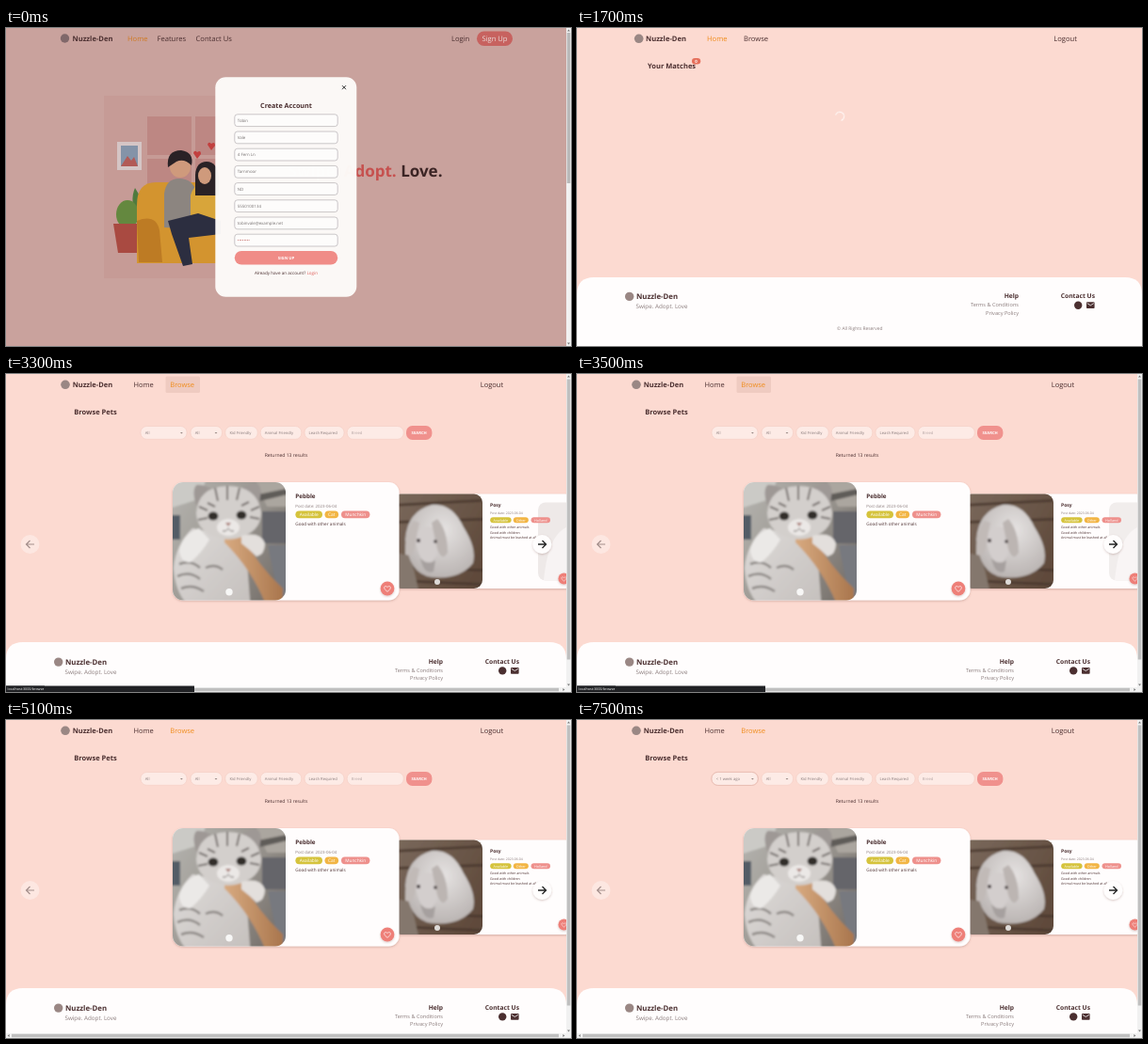
An HTML page for the animation above (8 s loop, 600 by 338 pixels).

```html
<!DOCTYPE html>
<html lang="en">
<head>
<meta charset="utf-8">
<title>Pet adoption site</title>
<style>
html, body { margin: 0; width: 100%; height: 100%; overflow: hidden; background: #fcdad1; }
svg { display: block; width: 600px; height: 338px; }
text { font-family: "Open Sans", sans-serif; fill: #4b2f30; white-space: pre; text-rendering: geometricPrecision; }
.b { font-weight: 700; }
.nav { font-size: 7.6px; }
.nav.slim { font-size: 7.5px; }
.head { font-size: 7.5px; font-weight: 700; }
.end { text-anchor: end; }
.mid { text-anchor: middle; }
.soft { fill: #8a7c7c; }
.white { fill: #fff; }
.hot { fill: #f08d1c; }
.logo { fill: #9a8784; }

/* One 8 s timeline drives every scene. */
.signup, .home, .browse, .bar, .wide, .menu, .pick-all, .pick-week, .old, .new, .focus, .tint {
  animation: 8s step-end infinite;
}
.signup { animation-name: signup; }
.home { animation-name: home; }
.browse, .wide { animation-name: browse; }
.bar { animation-name: bar; }
.menu { animation-name: menu; }
.pick-all { animation-name: pickAll; }
.pick-week { animation-name: pickWeek; }
.old { animation-name: old; }
.new { animation-name: new; }
.focus { animation-name: focus; }
.tint { animation-name: tint; }
.hover { animation: hover 8s linear infinite; }
.ghost { animation: ghost 8s linear infinite; }
.spin { animation: spin .8s linear infinite; transform-origin: 279px 94px; }
@keyframes signup { 0% { opacity: 1 } 1.25%, 100% { opacity: 0 } }
@keyframes home { 0% { opacity: 0 } 1.25% { opacity: 1 } 40%, 100% { opacity: 0 } }
@keyframes browse { 0% { opacity: 0 } 40%, 100% { opacity: 1 } }
@keyframes bar { 0% { opacity: 0 } 28.75% { opacity: 1 } 48.75%, 100% { opacity: 0 } }
@keyframes menu { 0% { opacity: 0 } 78.75% { opacity: 1 } 92.5%, 100% { opacity: 0 } }
@keyframes pickAll { 0% { opacity: 1 } 86.25%, 100% { opacity: 0 } }
@keyframes pickWeek { 0% { opacity: 0 } 86.25%, 100% { opacity: 1 } }
@keyframes old { 0% { opacity: 1 } 92.5%, 100% { opacity: 0 } }
@keyframes new { 0% { opacity: 0 } 92.5%, 100% { opacity: 1 } }
@keyframes focus { 0% { opacity: 0 } 78.75%, 100% { opacity: 1 } }
@keyframes tint { 0% { fill: #4b2f30 } 28.75%, 100% { fill: #f08d1c } }
@keyframes hover { 0%, 28.75% { opacity: 0 } 31.25%, 46.25% { opacity: 1 } 48.75%, 100% { opacity: 0 } }
@keyframes ghost { 0%, 42.5% { opacity: 1 } 50%, 100% { opacity: 0 } }
@keyframes spin { from { transform: rotate(-207deg) } to { transform: rotate(153deg) } }
</style>
</head>
<body>
<svg viewBox="0 0 600 338">
  <defs>
    <filter id="haze"><feGaussianBlur stdDeviation=".6"/></filter>
    <filter id="photo"><feGaussianBlur stdDeviation=".8"/></filter>
    <filter id="shade" x="-20%" y="-20%" width="140%" height="140%">
      <feDropShadow dx="0" dy="1" stdDeviation="1" flood-color="#7a4a40" flood-opacity=".3"/>
    </filter>
    <linearGradient id="kitchen" x2="1" y2=".6">
      <stop offset="0" stop-color="#b9b8b4"/><stop offset=".6" stop-color="#9a9690"/><stop offset="1" stop-color="#77716c"/>
    </linearGradient>
    <linearGradient id="fur" x2="1" y2="1">
      <stop offset="0" stop-color="#dddad8"/><stop offset="1" stop-color="#c4bfbc"/>
    </linearGradient>
    <linearGradient id="arm" x2="1"><stop offset="0" stop-color="#d8aa80"/><stop offset="1" stop-color="#a9764d"/></linearGradient>
    <linearGradient id="floor" y2=".6"><stop offset="0" stop-color="#7d6d60"/><stop offset="1" stop-color="#5f493a"/></linearGradient>
    <radialGradient id="bunny" cx=".55" cy=".35" r=".7">
      <stop offset="0" stop-color="#e6e3e2"/><stop offset="1" stop-color="#b7b1af"/>
    </radialGradient>
    <clipPath id="catClip"><rect x="177" y="115" width="120" height="125.5" rx="11"/></clipPath>
    <clipPath id="bunClip"><rect x="410" y="127.5" width="96" height="100.5" rx="9"/></clipPath>
    <clipPath id="pageClip"><rect width="595" height="333"/></clipPath>
    <path id="heart" d="M0 3C-6-1-2.5-4.5 0-1.7 2.5-4.5 6-1 0 3Z" fill="none" stroke="#fff" stroke-width=".7"/>
    <g id="footLeft">
      <circle class="logo" cx="55.7" cy="285.4" r="4.7"/>
      <text class="b" x="63" y="288.4" font-size="7.8">Nuzzle-Den</text>
      <text class="soft" x="62.5" y="298.3" font-size="6.25">Swipe. Adopt. Love</text>
    </g>
    <g id="footRight">
      <g class="b end" font-size="6.7">
        <text x="469" y="287.4">Help</text>
        <text x="550" y="287.4">Contact Us</text>
      </g>
      <g class="end" font-size="5.6">
        <text class="soft" x="469" y="296.3">Terms &amp; Conditions</text>
        <text class="soft" x="469" y="304.8">Privacy Policy</text>
      </g>
      <circle cx="532.2" cy="294.7" r="4.2" fill="#4b2f30"/>
      <rect x="541" y="291.3" width="8.6" height="6.8" rx=".8" fill="#4b2f30"/>
      <path d="M541.8 292.6l3.5 2.2 3.5-2.2" fill="none" stroke="#fff" stroke-width=".8"/>
    </g>
  </defs>

  <rect width="600" height="338" fill="#fcdad1"/>

  <g class="signup">
    <rect width="600" height="338" fill="#c9a29d"/>
    <g class="nav" filter="url(#haze)">
      <circle cx="62.5" cy="11" r="4.7" fill="#80686a"/>
      <text class="b" x="70.5" y="14">Nuzzle-Den</text>
      <text x="129" y="14" style="fill:#cf7a22">Home</text>
      <text x="160.5" y="14">Features</text>
      <text x="201.5" y="14">Contact Us</text>
      <text x="473" y="14">Login</text>
      <rect x="500" y="3.5" width="38" height="15.5" rx="7.7" fill="#c7625f"/>
      <text class="mid" x="519" y="14" style="fill:#eadcda">Sign Up</text>
    </g>
    <g filter="url(#haze)">
      <rect x="104" y="72" width="196" height="194" fill="#c69b96"/>
      <path d="M150 94h47v41h-47zM201 94h26v41h-26zM150 139h47v30h-47zM201 139h26v30h-26z" fill="#bd8783"/>
      <rect x="118" y="121" width="26" height="30" fill="#d5c5c5"/>
      <rect x="122" y="125" width="18" height="22" fill="#8493a8"/>
      <path d="M122 147l7-11 4 5 3-4 4 10z" fill="#b25a56"/>
      <path d="M139 203q-8-20-2-33 8 10 6 30 2-18 12-22 0 16-11 26z" fill="#4f7a3f"/>
      <ellipse cx="129" cy="198" rx="12" ry="15" fill="#64883f"/>
      <path d="M114 208h32l-5 31h-22z" fill="#a94a41"/>
      <path d="M139 250v-62q0-24 20-24h66v86z" fill="#d3942f"/>
      <path d="M139 205q20-8 24 10l3 34h-25z" fill="#bd7b24"/>
      <path d="M168 212v-36q2-16 16-16t18 14l2 40z" fill="#8c8580"/>
      <path d="M196 208v-30q4-14 16-14t14 14v36z" fill="#d8a53a"/>
      <path d="M172 205l32-8 24 8v14l-34 4 4 28-10 2-12-34z" fill="#2c2e40"/>
      <circle cx="185" cy="148" r="11" fill="#cf9a7c"/>
      <path d="M172 148q-2-18 14-18 14 2 11 16-8-8-16-4z" fill="#2a2226"/>
      <path d="M201 178v-22q1-14 12-14t13 16v20z" fill="#2a2226"/>
      <ellipse cx="211" cy="157" rx="7" ry="9" fill="#cf9a7c"/>
      <path d="M203 139l-4-6q1-4 4-1 4-3 4 2zM218 130l-4-6q1-4 4-1 4-3 4 2z" fill="#c2403f"/>
    </g>
    <text class="b end" x="463.5" y="158" font-size="17"><tspan fill="#eed9d5">Swipe.</tspan> <tspan fill="#c6504e">Adopt.</tspan> <tspan fill="#3c2525">Love.</tspan></text>
    <rect x="222.3" y="52.3" width="150" height="233.5" rx="11" fill="#fdfbf9" opacity=".97"/>
    <path d="M357 61.2l4 4m0-4l-4 4" stroke="#333" stroke-width="1"/>
    <text class="b mid" x="297.5" y="84.5" font-size="7.2">Create Account</text>
    <g id="fields" font-size="4.4"></g>
    <rect x="242.8" y="237" width="109.4" height="14.5" rx="7.2" fill="#f08c87"/>
    <text class="b mid white" x="297.5" y="246" font-size="4.3">SIGN UP</text>
    <text class="mid" x="297.5" y="261.8" font-size="4.6">Already have an account? <tspan fill="#e0605c">Login</tspan></text>
    <rect x="595" width="5" height="338" fill="#f1f1f1"/>
    <rect x="595.7" y="5" width="3.6" height="160" fill="#b9b9b9"/>
    <path d="M596 3.4l1.5-2 1.5 2zM596 334.6l1.5 2 1.5-2z" fill="#777"/>
  </g>

  <g class="home">
    <g class="nav">
      <circle class="logo" cx="65.7" cy="11.3" r="4.8"/>
      <text class="b" x="73" y="14">Nuzzle-Den</text>
      <text class="hot" x="138" y="14">Home</text>
      <rect class="hover" x="172" y="2.5" width="37" height="17.5" rx="1.5" fill="#efcbc1"/>
      <text class="tint" x="177" y="14">Browse</text>
      <text x="506.3" y="14">Logout</text>
    </g>
    <text class="head" x="75" y="43">Your Matches</text>
    <rect x="122" y="32" width="9.2" height="6.6" rx="3.3" fill="#e5705c"/>
    <text class="b mid white" x="126.6" y="37" font-size="4.4">0</text>
    <circle class="spin" cx="279" cy="94" r="4.6" pathLength="100" fill="none" stroke="#fff" stroke-opacity=".75" stroke-width="1.2" stroke-dasharray="65 35"/>
    <path d="M0 338V283q0-18 18-18H582q18 0 18 18V338z" fill="#fffdfd"/>
    <use href="#footLeft"/>
    <use href="#footRight"/>
    <text class="mid soft" x="300.3" y="321" font-size="4.9">© All Rights Reserved</text>
  </g>

  <g class="browse">
    <g class="nav slim">
      <circle class="logo" cx="63" cy="11.3" r="4.8"/>
      <text class="b" x="70.7" y="14">Nuzzle-Den</text>
      <text x="135.5" y="14">Home</text>
      <rect class="hover" x="169.5" y="2.5" width="36.5" height="17.5" rx="1.5" fill="#efcbc1"/>
      <text class="hot" x="174.3" y="14">Browse</text>
      <text x="503.8" y="14">Logout</text>
    </g>
    <text class="head" x="72.3" y="43">Browse Pets</text>
    <g id="filters" font-size="4.2"></g>
    <rect class="focus" x="142.8" y="55.3" width="49.6" height="14.2" rx="6.8" fill="none" stroke="#e2b5ab" stroke-width=".7"/>
    <text class="old soft" x="147.7" y="64" font-size="4.2">All</text>
    <text class="new soft" x="147.7" y="64" font-size="4.2">&lt; 1 week ago</text>
    <path d="M185 61.9h2.8l-1.4 1.6zM221.6 61.9h2.8l-1.4 1.6z" fill="#94847f"/>
    <rect x="425" y="55" width="27.4" height="15" rx="6.5" fill="#f0918d"/>
    <text class="b mid white" x="438.7" y="64" font-size="4.2">SEARCH</text>
    <text class="mid" x="297.5" y="88" font-size="5">Returned 13 results</text>

    <g clip-path="url(#pageClip)">
      <rect x="410" y="127.5" width="193" height="100.5" rx="9" fill="#fffdfd" filter="url(#shade)"/>
      <g clip-path="url(#bunClip)"><g filter="url(#photo)">
        <rect x="400" y="117" width="116" height="121" fill="url(#floor)"/>
        <path d="M400 140l116-6M400 158l116-4M400 204l116 5M400 219l116 5" stroke="#4a382d" stroke-width="2.5"/>
        <path d="M400 186l30 8 10 44h-40z" fill="#84776d"/>
        <path d="M424 176Q426 146 452 139q22-2 34 24 14 22 10 38-14 18-44 15-24-3-28-40z" fill="url(#bunny)"/>
        <path d="M434 172q8-14 22-8 8 22-4 36-14 4-18-28z" fill="#d3cecd"/>
        <path d="M432 156q-9 14-8 36 9 4 11-12 2-14 4-22z" fill="#c1bab7"/>
        <path d="M458 154q11 12 11 36-6 10-11-4-4-18-6-28z" fill="#bcb5b2"/>
        <path d="M440 196q8 8 16 2l-2 12q-10 4-14-14z" fill="#a6a09f"/>
        <circle cx="438" cy="177" r="2" fill="#3a3233"/><circle cx="456" cy="178" r="1.8" fill="#3a3233"/>
      </g></g>
      <circle cx="458" cy="221" r="3" fill="#fff" opacity=".8"/>
      <text class="b" x="514" y="141" font-size="5">Posy</text>
      <text class="soft" x="514" y="149.2" font-size="3.45">Post date: 2023-06-04</text>
      <g font-size="3.6">
        <text x="514" y="164">Good with other animals</text>
        <text x="514" y="169.6">Good with children</text>
        <text x="514" y="175.2">Animal must be leashed at all times</text>
      </g>
      <g class="ghost"><g opacity=".65">
        <rect x="565" y="136.5" width="42" height="83" rx="8" fill="#e5dfde"/>
        <path d="M571 219q4-40 18-52 10-8 18-6v58z" fill="#f3efee"/>
      </g></g>
      <circle cx="592.5" cy="217.5" r="6" fill="#ee7f78" filter="url(#shade)"/>
      <use href="#heart" transform="translate(592.5 217.8) scale(.75)"/>

      <rect x="177" y="115" width="240.5" height="125.5" rx="11" fill="#fffdfd" filter="url(#shade)"/>
      <g clip-path="url(#catClip)"><g filter="url(#photo)">
        <rect x="167" y="105" width="140" height="146" fill="url(#kitchen)"/>
        <path d="M167 105h48l-10 28-38 12z" fill="#cbcac6"/>
        <path d="M167 150h18v26h-18z" fill="#535b66"/>
        <path d="M262 105h45v36h-30z" fill="#aba69f"/>
        <path d="M268 128l39-8v6l-37 9z" fill="#5f5b58"/>
        <path d="M272 146h35v34h-35z" fill="#65656a"/>
        <path d="M278 182h29v69h-15z" fill="#77797f"/>
        <path d="M198 164q-18 18-20 42 2 32 22 45h60l-6-76z" fill="url(#fur)"/>
        <path d="M184 202q12-5 22 4M182 215q13-6 24 3M186 228q12-5 24 3M212 206q10-5 18 2" stroke="#8d8885" stroke-width="2.5" fill="none"/>
        <path d="M232 168q10-6 18 2 16 32 44 58v23h-16q-14-40-46-72z" fill="url(#arm)"/>
        <path d="M202 140q-5-16 0-22 8-2 20 7zM268 138q5-15 0-21-9-2-20 6z" fill="#9e9895"/>
        <path d="M202 148q2-28 33-29 32 0 36 28 0 18-18 25-18 8-36-1-14-7-15-23z" fill="#d3cfcc"/>
        <path d="M222 121l3 14M235 119v15M248 121l-3 13M205 141l9 4M204 155l10-2M269 141l-9 4M269 154l-10-2M214 137l8 4M258 136l-8 4" stroke="#77716e" stroke-width="2" fill="none"/>
        <ellipse cx="236" cy="163" rx="12" ry="9" fill="#ebe8e6"/>
        <g fill="#332d2a"><ellipse cx="220" cy="151" rx="5.4" ry="4.6"/><ellipse cx="250" cy="150" rx="5.4" ry="4.6"/></g>
        <path d="M233 158h6l-3 4z" fill="#a97a74"/>
        <path d="M230 167q4 1 6-3 2 4 6 3" stroke="#6f6765" stroke-width="1" fill="none"/>
        <path d="M205 164q-18 6-21 24 2 14 12 12 12-10 20-24z" fill="#ebe9e7"/>
        <path d="M250 172q20-5 25 8 0 12-9 14-8-8-16-14z" fill="#e3dfdc"/>
      </g></g>
      <circle cx="237" cy="231.8" r="3.7" fill="#fff" opacity=".85"/>
      <text class="b" x="307.3" y="131.6" font-size="6.3">Pebble</text>
      <text class="soft" x="307.3" y="141.6" font-size="4.35">Post date: 2023-06-04</text>
      <text x="307.3" y="160.8" font-size="4.65">Good with other animals</text>
      <g id="tags"></g>
      <circle cx="405" cy="228" r="7.4" fill="#ee7f78" filter="url(#shade)"/>
      <use href="#heart" x="405" y="228.3"/>
    </g>

    <circle cx="25.5" cy="181" r="10" fill="#fff" opacity=".35"/>
    <path d="M30 181h-8.5m4-4l-4 4 4 4" fill="none" stroke="#a38f8b" stroke-width="1.2"/>
    <circle cx="569.3" cy="181" r="10" fill="#fffdfd" filter="url(#shade)"/>
    <path d="M565 181h8.5m-4-4l4 4-4 4" fill="none" stroke="#222" stroke-width="1.3"/>

    <path d="M0 338V303q0-18 18-18H577q18 0 18 18V338z" fill="#fffdfd"/>
    <use href="#footLeft" y="20.7"/>
    <use href="#footRight" x="-5" y="20.7"/>

    <path d="M595 0h5v338H0v-5h595z" fill="#f1f1f1"/>
    <path d="M595.7 5.5h3.6v298h-3.6zM6 333.7h581v3.6H6z" fill="#bfbfbf"/>
    <path d="M596 3.4l1.5-2 1.5 2zM596 329.6l1.5 2 1.5-2zM3.6 334l-2 1.5 2 1.5zM591.4 334l2 1.5-2 1.5z" fill="#777"/>

    <g class="menu">
      <rect x="142.4" y="69.6" width="51" height="32.6" fill="#fff" stroke="#777" stroke-width=".6"/>
      <rect class="pick-all" x="142.7" y="76.4" width="50.4" height="6.5" fill="#1a80e6"/>
      <rect class="pick-week" x="142.7" y="82.8" width="50.4" height="6.5" fill="#1a80e6"/>
      <g id="options" font-size="4.4"></g>
      <text class="pick-all white" x="147.8" y="81.3" font-size="4.4">All</text>
      <text class="pick-week white" x="147.8" y="87.6" font-size="4.4">&lt; 1 week ago</text>
    </g>
  </g>

  <g class="bar">
    <rect y="331.5" width="41" height="6.5" fill="#202124"/>
    <rect class="wide" y="331.5" width="200" height="6.5" fill="#202124"/>
    <text class="white" x="1.5" y="336.2" font-size="3.7">localhost:3000/browse</text>
  </g>
</svg>
<script>
const fill = (id, rows, draw) => {
  document.getElementById(id).innerHTML = rows.map(draw).join('');
};

fill('fields', ['Tobin', 'Vale', '4 Fern Ln', 'Tarnmoor', 'ND', '5550100134', 'tobinvale@example.net', '••••••••'], (label, i) => {
  const y = 98.2 + 18.2 * i;
  const ink = i === 7 ? '#c0605c' : '#757070';
  return `<rect x="242.8" y="${y - 6.4}" width="109.4" height="12.8" rx="3" fill="#fff" fill-opacity=".6" stroke="#b5b0b4" stroke-width=".7"/>
    <text x="245.8" y="${y + 1.6}" style="fill:${ink}">${label}</text>`;
});

fill('filters', [
  [143, 49, 4.7, ''], [196, 33.5, 4.7, 'All'], [232.8, 34.4, 4.6, 'Kid Friendly'],
  [270.2, 43.6, 4.6, 'Animal Friendly'], [317, 42, 4.6, 'Leash Required'], [362.2, 60, 4.6, 'Breed'],
], ([x, w, pad, label]) =>
  `<rect x="${x}" y="55.5" width="${w}" height="13.8" rx="6.5" fill="#fdebe6" stroke="#f3cdc3" stroke-width=".6"/>
   <text class="soft" x="${x + pad}" y="64"${label === 'Breed' ? ' opacity=".6"' : ''}>${label}</text>`);

const [olive, amber, rose] = ['#d5c33c', '#f2b544', '#ee908c'];
fill('tags', [
  [307.4, 28.6, 1, olive, 'Available'], [338.5, 14.6, 1, amber, 'Cat'], [356, 30.4, 1, rose, 'Munchkin'],
  [514.2, 22.4, .78, olive, 'Available'], [538.8, 16, .78, amber, 'Other'], [557.6, 20.4, .78, rose, 'Holland'],
], ([x, w, k, color, label]) => {
  const y = k === 1 ? 149.3 : 155.2;
  return `<rect x="${x}" y="${y - 3.9 * k}" width="${w}" height="${7.8 * k}" rx="${3.9 * k}" fill="${color}"/>
    <text class="mid white" x="${x + w / 2}" y="${y + 1.7 * k}" font-size="${4.8 * k}">${label}</text>`;
});

fill('options', ['Date Posted', 'All', '&lt; 1 week ago', '&lt; 1 month ago', '&gt; 6 months ago'], (label, i) =>
  `<text x="147.8" y="${75 + 6.3 * i}">${label}</text>`);
</script>
</body>
</html>
```
